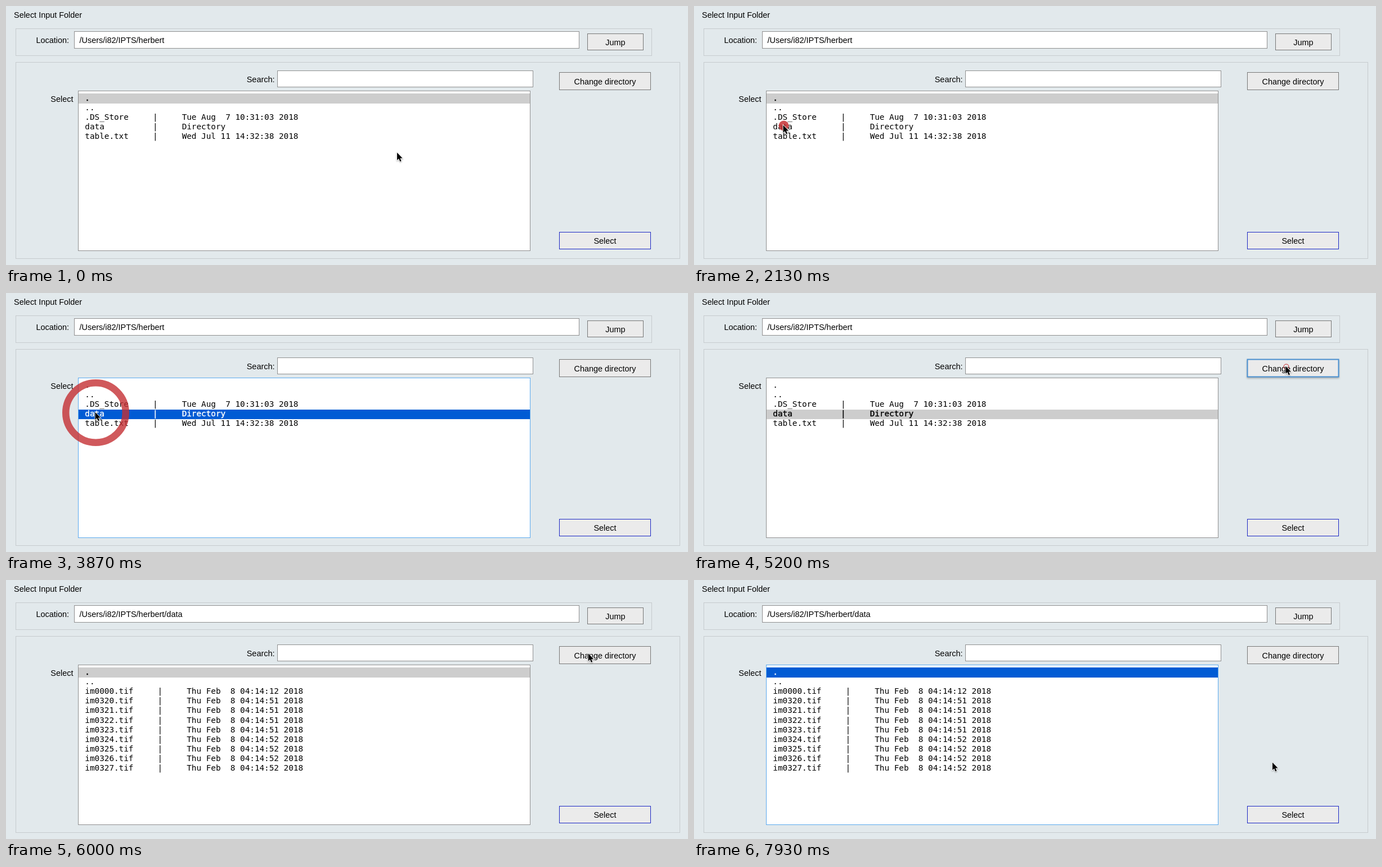
These frames come from a looping animation (1212x462 px, 8 s). An HTML page:

```html
<!DOCTYPE html>
<html lang="en">
<head>
<meta charset="utf-8">
<title>Select Input Folder</title>
<style>
  html, body { margin: 0; width: 100%; height: 100%; overflow: hidden; background: #e2e9ec; }
  svg { display: block; font: 14.45px "Liberation Sans", Arial, sans-serif; }
  .frame { fill: none; stroke: #c6cbce; }
  .field { fill: #fff; stroke: #8f8f8f; }
  .button { fill: #ebebeb; stroke: #777; }
  .primary { stroke: #1b27c4; }
  .hover { filter: drop-shadow(0 2px 1.5px rgba(0, 0, 0, .25)); }
  .active { stroke: #4a90d0; stroke-width: 2; }
  .focus { stroke: #5aa9ee; }
  .end { text-anchor: end; }
  .mid { text-anchor: middle; }
  #rows text { font: 14.32px "DejaVu Sans Mono", monospace; white-space: pre; }
  .picked { stroke: currentColor; fill: currentColor; stroke-width: .4; }
</style>
</head>
<body>
<svg width="1212" height="462">
  <text x="14" y="20.5">Select Input Folder</text>

  <rect class="frame" x="17.5" y="40.5" width="1130" height="48"/>
  <text class="end" x="112" y="66">Location:</text>
  <rect class="field" x="121.5" y="45.5" width="897" height="30"/>
  <text id="path" x="130.5" y="66"></text>
  <rect class="button" x="1033.5" y="49.5" width="99" height="29"/>
  <text class="mid" x="1083" y="70">Jump</text>

  <rect class="frame" x="17.5" y="100.5" width="1180" height="350"/>
  <text class="end" x="477.5" y="135.5">Search:</text>
  <rect class="field" x="482.5" y="115.5" width="454" height="29"/>
  <rect id="change" class="button" x="983.5" y="118.5" width="162" height="31"/>
  <text class="mid" x="1064.5" y="139.5">Change directory</text>

  <text class="end" x="119.5" y="170.5">Select</text>
  <rect id="list" class="field" x="128.5" y="151.5" width="803" height="285"/>
  <g id="rows"></g>
  <rect class="button primary" x="983.5" y="403.5" width="162" height="30"/>
  <text class="mid" x="1064.5" y="424">Select</text>

  <circle id="ring" fill="#c53034" stroke="#c53034"/>
  <path id="cursor" d="M0 0V13.6L3.1 10.8 5.3 16 7.5 15 5.4 10.1H9.6Z"
        stroke="#fff" stroke-width="1.6" paint-order="stroke"
        style="filter: drop-shadow(0 1px 1px rgba(0, 0, 0, .35))"/>
</svg>
<script>
const FPS = 15, FRAMES = 120;
const $ = id => document.getElementById(id);

const home = [".", "..",
  [".DS_Store", "Tue Aug  7 10:31:03 2018"],
  ["data", "Directory"],
  ["table.txt", "Wed Jul 11 14:32:38 2018"]];

const data = [".", "..", ["im0000.tif", "Thu Feb  8 04:14:12 2018"]];
for (let i = 320; i < 328; i++)
  data.push([`im0${i}.tif`, `Thu Feb  8 04:14:5${i < 324 ? 1 : 2} 2018`]);

// Cursor stops: frame, x, y
const stops = [
  [11, 695, 261.5], [18, 222, 166], [20, 203, 195], [22, 203, 195],
  [28, 158.5, 212.5], [58, 158.5, 212.5], [64, 1036, 126], [65, 1036, 126],
  [70, 1051.5, 130.5], [89, 1051.5, 130.5], [101, 199.5, 159], [102, 199.5, 159],
  [103, 199.5, 158.5], [115, 199.5, 158.5], [119, 1028, 325.5]];

// Frames of each mouse press and release
const clicks = [[32, 35], [50, 53], [75, 78], [106, 109]];
const RING_FRAMES = 7;

function cursorAt(f) {
  const i = stops.findIndex(s => s[0] >= f);
  if (i === 0) return stops[0].slice(1);
  const [f0, x0, y0] = stops[i - 1], [f1, x1, y1] = stops[i];
  const u = (f - f0) / (f1 - f0), e = u * u * (3 - 2 * u);
  return [x0 + (x1 - x0) * e, y0 + (y1 - y0) * e];
}

function drawRows(rows, picked, focused) {
  const width = Math.max(...rows.map(r => r[0].length));
  const top = i => 156.6 + 17.14 * i;
  const band = `<rect x="129" y="${Math.floor(top(picked))}" width="802" height="${picked ? 17 : 18}"
    fill="${focused ? "#005bd4" : "#cdcdcd"}"/>`;
  $("rows").innerHTML = band + rows.map((row, i) => {
    const label = Array.isArray(row) ? `${row[0].padEnd(width)}     |     ${row[1]}` : row;
    const look = i === picked ? ` class="picked" color="${focused ? "#fff" : "#000"}"` : "";
    return `<text x="140.3" y="${top(i) + 12.2}"${look}>${label}</text>`;
  }).join("");
}

function drawClick(f) {
  const ring = $("ring");
  const click = clicks.find(([down, up]) => f >= down && f < up + RING_FRAMES);
  ring.style.display = click ? "" : "none";
  if (!click) return;
  const [x, y] = cursorAt(click[0]), age = f - click[1], held = age < 0;
  const outer = held ? 9 : 5 + 10.9 * age, line = held ? 0 : outer * .21;
  const set = { cx: x + 1, cy: y + 1, r: outer - line / 2, "stroke-width": line,
    "fill-opacity": held ? 1 : 0, opacity: held ? .85 : 1 - .04 * age };
  for (const name in set) ring.setAttribute(name, set[name]);
}

function draw(f) {
  const inData = f >= 79;
  const focused = f >= 49 && f < 75 || f >= 106;
  $("path").textContent = "/Users/i82/IPTS/herbert" + (inData ? "/data" : "");
  drawRows(inData ? data : home, !inData && f >= 49 ? 3 : 0, focused);
  $("list").classList.toggle("focus", focused);
  $("change").classList.toggle("hover", f >= 64 && f < 79);
  $("change").classList.toggle("active", f >= 75 && f < 79);
  drawClick(f);
  $("cursor").setAttribute("transform", `translate(${cursorAt(f)})`);
}

let shown = -1;
const start = performance.now();
function tick() {
  const f = Math.floor((performance.now() - start + 5) * FPS / 1000) % FRAMES;
  if (f !== shown) draw(shown = f);
  requestAnimationFrame(tick);
}
tick();
</script>
</body>
</html>
```
